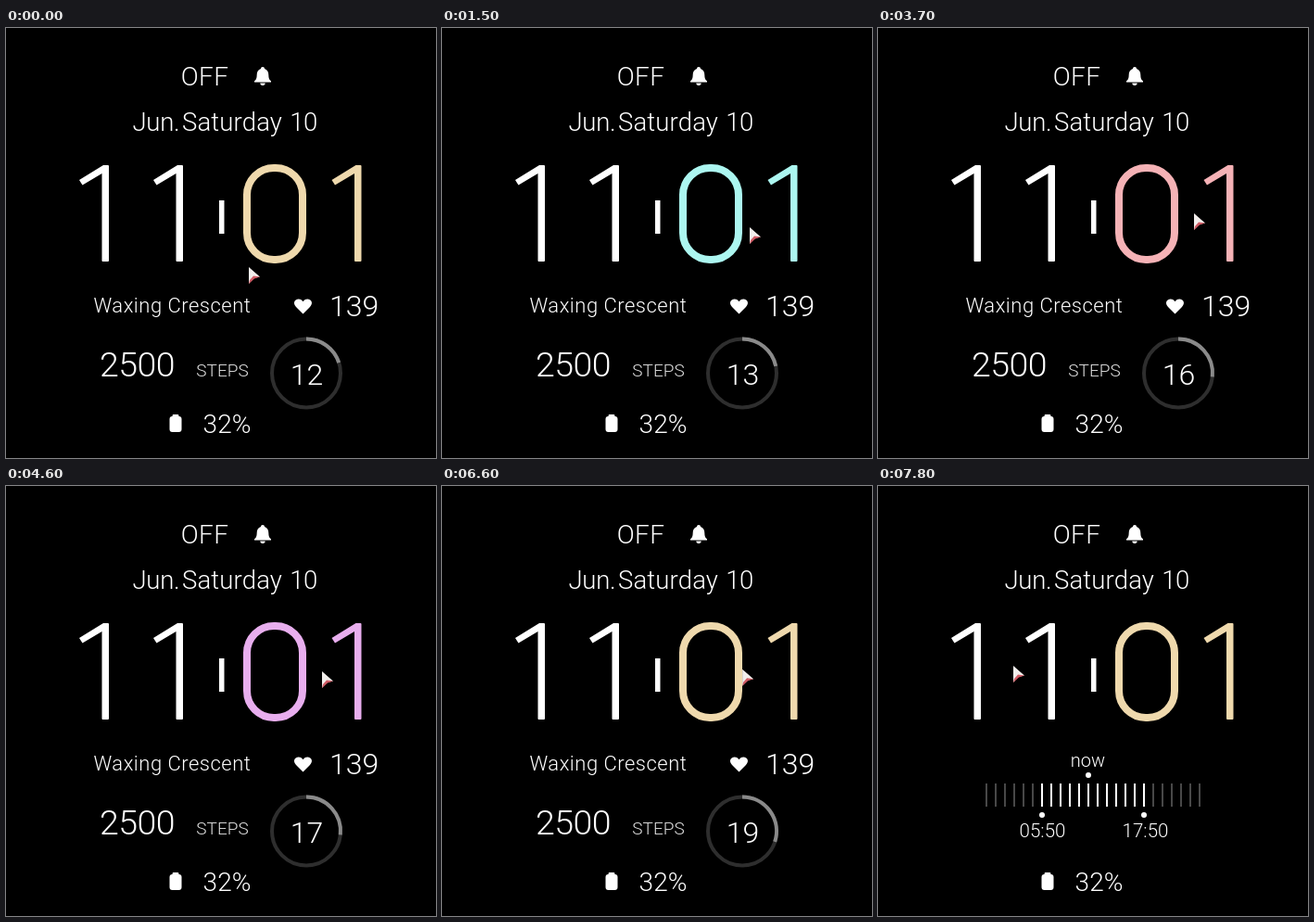
These frames come from a looping animation (464 by 464 pixels, 8 s). An HTML page:

```html
<!DOCTYPE html>
<html lang="en">
<head>
<meta charset="utf-8">
<title>Watch face</title>
<style>
  html, body { margin: 0; width: 100%; height: 100%; overflow: hidden; background: #000; }
  svg { display: block; width: 100vw; height: 100vh; }
  text { font-family: Roboto, "Open Sans", sans-serif; font-weight: 300; fill: #fff; text-anchor: middle; }
  .start { text-anchor: start; }
</style>
</head>
<body>
<svg viewBox="0 0 464 464">
  <defs>
    <path id="one" d="M111 149Q111 148 110 148H105L79 164L82.5 169.5L103.5 157V251Q103.5 252 104.5 252H110Q111 252 111 251Z"/>
  </defs>
  <rect width="464" height="464"/>

  <text x="214.5" y="62" font-size="28" letter-spacing="0.4">OFF</text>
  <g fill="#fff">
    <path d="M277 42C278.4 42 279 42.8 279 44C282 45 283.3 47.5 283.3 50.5C283.3 54.5 284.3 56 286 57.3V58.6H268V57.3C269.7 56 270.7 54.5 270.7 50.5C270.7 47.5 272 45 275 44C275 42.8 275.6 42 277 42Z"/>
    <path d="M274.3 59.6H279.7A2.7 2.4 0 0 1 274.3 59.6Z"/>
  </g>

  <g font-size="27.5">
    <text class="start" x="136.5" y="111" letter-spacing="-0.3">Jun.</text>
    <text class="start" x="190" y="111" letter-spacing="0.15">Saturday</text>
    <text x="321" y="111" letter-spacing="-0.5">10</text>
  </g>

  <g fill="#fff">
    <use href="#one"/>
    <use href="#one" x="80"/>
    <rect x="230" y="186" width="5.5" height="36"/>
  </g>
  <g id="minutes">
    <rect x="260" y="151" width="60" height="99" rx="29" fill="none" stroke="currentColor" stroke-width="8"/>
    <use href="#one" x="272.5" fill="currentColor"/>
  </g>

  <g id="stats">
    <text class="start" x="94.5" y="307" font-size="22" letter-spacing="0.5">Waxing Crescent</text>
    <path fill="#fff" d="M320.5 308.5L313 301C308.8 296.5 312 292.5 315.6 292.5C318 292.5 319.6 293.6 320.5 295.3C321.4 293.6 323 292.5 325.4 292.5C329 292.5 332.2 296.5 328 301Z"/>
    <text x="375.5" y="311" font-size="32">139</text>
    <text x="141.5" y="376" font-size="37.5" letter-spacing="-0.6">2500</text>
    <text x="233.5" y="375.5" font-size="19" style="fill:#ddd">STEPS</text>
    <g fill="none" stroke-width="4">
      <circle cx="324" cy="372.5" r="37" stroke="#2e2e2e"/>
      <path id="arc" stroke="#8a8a8a"/>
    </g>
    <text id="seconds" x="324.5" y="385" font-size="32"></text>
  </g>

  <g id="daylight">
    <text x="226.5" y="303" font-size="20">now</text>
    <g id="ticks" stroke-width="2"></g>
    <g fill="#fff">
      <circle cx="227" cy="312" r="3"/>
      <circle cx="177" cy="355" r="3"/>
      <circle cx="287" cy="355" r="3"/>
    </g>
    <text x="177.5" y="378.5" font-size="20.5">05:50</text>
    <text x="288.5" y="378.5" font-size="20.5">17:50</text>
  </g>

  <path fill="#fff" d="M180.5 417H185.5Q186.5 417 186.5 419Q189.5 419 189.5 422V433Q189.5 436 186.5 436H179.5Q176.5 436 176.5 433V422Q176.5 419 179.5 419Q179.5 417 180.5 417Z"/>
  <text x="238.5" y="436.5" font-size="28">32%</text>

  <g id="cursor">
    <path d="M0 0L12 10.5L5 12L0 18Z" fill="#f2eeec"/>
    <path d="M5 9.5L12 10.5L6 12.5L0 18L1 14Z" fill="#cf5a64"/>
  </g>
</svg>
<script>
  const LOOP = 8000;
  const $ = id => document.getElementById(id);

  // Each press, one second apart, picks the next tint.
  const tints = [
    [239, 217, 173], [172, 246, 240], [172, 245, 203],
    [245, 178, 182], [232, 174, 238], [176, 190, 242]
  ];

  // time, x, y of the pointer tip
  const route = [
    [0, 262, 258], [400, 437, 236], [800, 332, 215], [1500, 332, 215],
    [1700, 341, 200], [6500, 341, 200], [7100, 113, 171],
    [7400, 113, 171], [7800, 146, 194], [LOOP, 146, 194]
  ];

  const clamp = v => Math.max(0, Math.min(1, v));
  const ease = v => v * v * (3 - 2 * v);
  const mix = (a, b, k) => a + (b - a) * k;
  const secondsAt = t => 12 + Math.floor((t + 450) / 1000);

  for (let i = 0; i < 24; i++) {
    const x = 117 + i * 10;
    const lit = x >= 177 && x <= 287;
    $("ticks").innerHTML += `<path d="M${x} 321V346" stroke="${lit ? "#fff" : "#484848"}"/>`;
  }

  function pointer(t) {
    const i = route.findIndex(p => p[0] > t);
    const a = route[i - 1], b = route[i];
    const k = ease((t - a[0]) / (b[0] - a[0]));
    return [mix(a[1], b[1], k), mix(a[2], b[2], k)];
  }

  function tint(t) {
    const press = Math.min(6, Math.max(0, Math.floor((t - 50) / 1000)));
    if (!press) return tints[0];
    const k = clamp((t - press * 1000 - 50) / 100);
    const from = tints[press - 1], to = tints[press % 6];
    return from.map((c, i) => Math.round(mix(c, to[i], k)));
  }

  function draw(t) {
    // The ring follows the number a moment later.
    const angle = secondsAt(t - 100) * Math.PI / 30;
    const x = 324 + 37 * Math.sin(angle), y = 372.5 - 37 * Math.cos(angle);
    $("seconds").textContent = secondsAt(t);
    $("arc").setAttribute("d", `M324 335.5A37 37 0 0 1 ${x} ${y}`);
    $("minutes").style.color = `rgb(${tint(t)})`;

    const swapped = t >= 7400;
    $("stats").style.display = swapped ? "none" : "";
    $("daylight").style.display = swapped ? "" : "none";
    $("cursor").setAttribute("transform", `translate(${pointer(t)})`);
  }

  // The picture advances ten times a second.
  function tick() {
    draw(Math.floor(performance.now() % LOOP / 100) * 100);
    requestAnimationFrame(tick);
  }
  tick();
</script>
</body>
</html>
```
